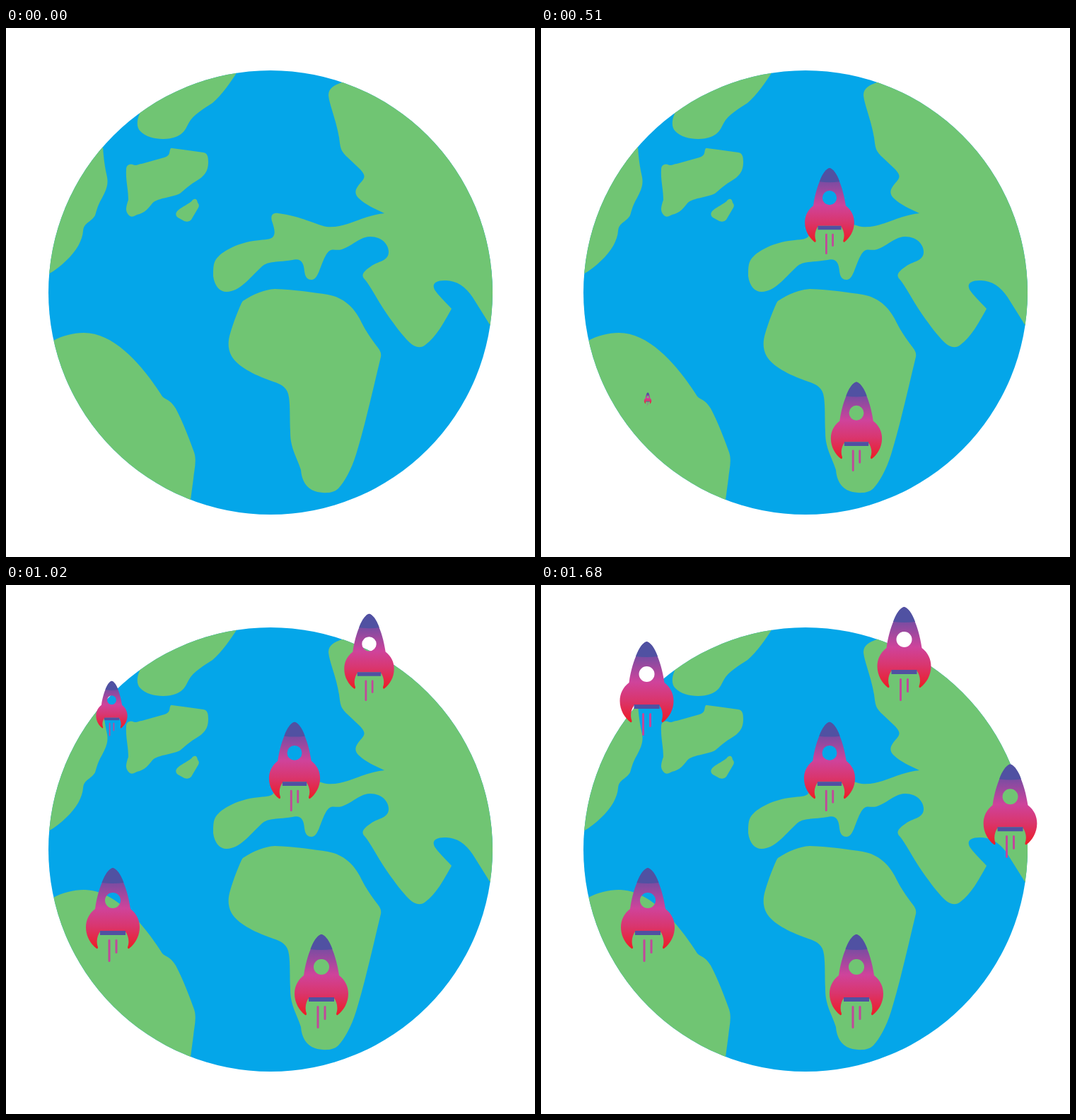
An HTML page for the animation above (2.7 s loop, 748 by 748 pixels).

```html
<!DOCTYPE html>
<html lang="en">
<head>
<meta charset="utf-8">
<title>Rockets around the globe</title>
<style>
  html, body { margin: 0; width: 100%; height: 100%; overflow: hidden; background: #fff; }
  svg { display: block; width: 100%; height: 100%; }
</style>
</head>
<body>
<svg viewBox="0 0 748 748">
  <defs>
    <clipPath id="globe"><circle cx="374" cy="374" r="314"/></clipPath>
    <linearGradient id="hull" gradientUnits="userSpaceOnUse" x1="0" y1="-134" x2="0" y2="-20">
      <stop offset=".12" stop-color="#6a4ea3"/>
      <stop offset=".5" stop-color="#cf439b"/>
      <stop offset=".72" stop-color="#d9366f"/>
      <stop offset="1" stop-color="#ee1c25"/>
    </linearGradient>
    <!-- Rocket with its origin just below the flames -->
    <g id="rocket">
      <path fill="url(#hull)" fill-rule="evenodd" d="M0-134C7-133 20-111 25-76C34-69 38-60 38-50C38-37 31-26 23-20Q21-19 21-22C24-30 22-39 17-45H-17C-22-39-24-30-21-22Q-21-19-23-20C-31-26-38-37-38-50C-38-60-34-69-25-76C-20-111-7-133 0-134Z
        M-11-88a11 11 0 1 0 22 0a11 11 0 1 0-22 0Z"/>
      <path fill="#5051a2" d="M0-134C5-133 11-126 15.500-113Q0-111-15.500-113C-11-126-5-133 0-134Z"/>
      <path fill="#5051a2" d="M-18-45H18V-39H-18Z"/>
      <path stroke="#c2479b" stroke-width="3" stroke-linecap="round" d="M-5-31.500V-2.500M5-31.500V-14.500"/>
    </g>
  </defs>

  <g clip-path="url(#globe)">
    <path fill="#04a6e9" d="M0 0H748V748H0Z"/>
    <g fill="#70c573">
      <path d="M327 55V62C318 76 305 95 292 106C280 114 265 122 258 135C253 145 250 150 240 154C225 160 200 157 190 146C184 140 185 130 189 121L180 60Z"/>
      <path d="M137 168C138 185 140 198 143 211C145 222 141 230 136 240C130 250 128 258 126 265C120 275 110 275 109 287C108 300 100 315 85 329C78 336 69 343 60 348H30V150Z"/>
      <path d="M235 170L279 176C285 177 286 182 286 190C286 203 280 210 268 217C258 223 252 229 246 234C235 240 212 240 206 249C200 257 195 261 189 263C183 264 178 270 173 264C168 258 170 252 173 243C173 228 169 215 170 200C170 194 174 192 179 193C184 196 188 192 192 192L224 183C232 181 231 175 232 172Q233 169 235 170Z"/>
      <path d="M266 242Q270 241 271 247Q274 250 272 254L262 271Q259 275 252 273L243 268Q238 264 242 259C250 251 260 249 264 243Z"/>
      <path d="M475 77C464 81 456 85 456 95C457 108 467 130 471 155C473 170 473 173 482 182L501 200C508 208 508 211 503 217C495 226 491 232 498 240C508 250 522 256 535 262C500 266 480 284 453 281C435 277 420 267 385 262C376 261 374 266 376 273C379 282 382 291 377 296C372 300 362 299 350 301C325 305 305 316 297 327C293 333 293 340 293 351C295 365 302 373 312 373C330 373 345 353 360 339C370 329 378 332 405 328C418 325 421 333 422 344C423 353 427 356 432 356C442 356 444 335 453 320C460 309 465 316 475 313C490 308 500 295 515 295C533 295 542 308 541 318C540 330 525 330 516 337C506 344 502 348 506 354C514 362 522 380 539 405C551 422 560 434 570 444C577 451 586 454 593 448C608 437 619 417 630 397C620 386 612 379 606 370C602 362 607 357 620 357C635 356 650 365 660 381L685 421H740V40H475Z"/>
      <path d="M335 386C350 376 365 370 380 369C410 370 435 374 455 377C478 381 492 396 500 411C510 432 520 444 528 455Q531 460 530 465C518 515 508 560 495 603C488 625 479 641 470 651C462 659 447 658 437 655C425 651 418 640 417 625C412 608 402 595 402 572C401 550 402 535 400 522C398 508 390 504 375 499C350 490 328 479 319 464C313 453 314 442 317 432C322 415 328 400 333 389Q334 387 335 386Z"/>
      <path d="M67 442C80 435 95 431 110 431C155 431 195 480 221 521C226 526 232 525 240 538C250 557 258 578 266 600C270 612 266 625 265 637L261 667L250 740H20V442Z"/>
    </g>
  </g>
  <g id="fleet"></g>
</svg>
<script>
  const LOOP = 2700, STEP = 30;
  const rockets = [
    { x: 408, y: 321, size: 0.95, start: 10, end: 555 },
    { x: 446, y: 628, size: 1, start: 240, end: 545 },
    { x: 151, y: 534, size: 1, start: 473, end: 900 },
    { x: 513.5, y: 165, size: 1, start: 575, end: 1105 },
    { x: 149.5, y: 214, size: 1, start: 885, end: 1203 },
    { x: 663.5, y: 387, size: 1, start: 1168, end: 1685 }
  ];
  const fleet = document.getElementById('fleet');
  for (const rocket of rockets) {
    rocket.node = document.createElementNS('http://www.w3.org/2000/svg', 'use');
    rocket.node.setAttribute('href', '#rocket');
    fleet.append(rocket.node);
  }

  // Gentle ease-out
  const ease = x => x + 0.65 * x * (1 - x);

  function draw(now) {
    const time = Math.floor((now % LOOP) / STEP) * STEP;
    for (const { node, x, y, size, start, end } of rockets) {
      const progress = Math.min(1, (time - start) / (end - start));
      node.style.display = progress > 0 ? '' : 'none';
      if (progress > 0) {
        node.setAttribute('transform', `translate(${x} ${y}) scale(${size * ease(progress)})`);
      }
    }
    requestAnimationFrame(draw);
  }
  draw(0);
</script>
</body>
</html>
```
